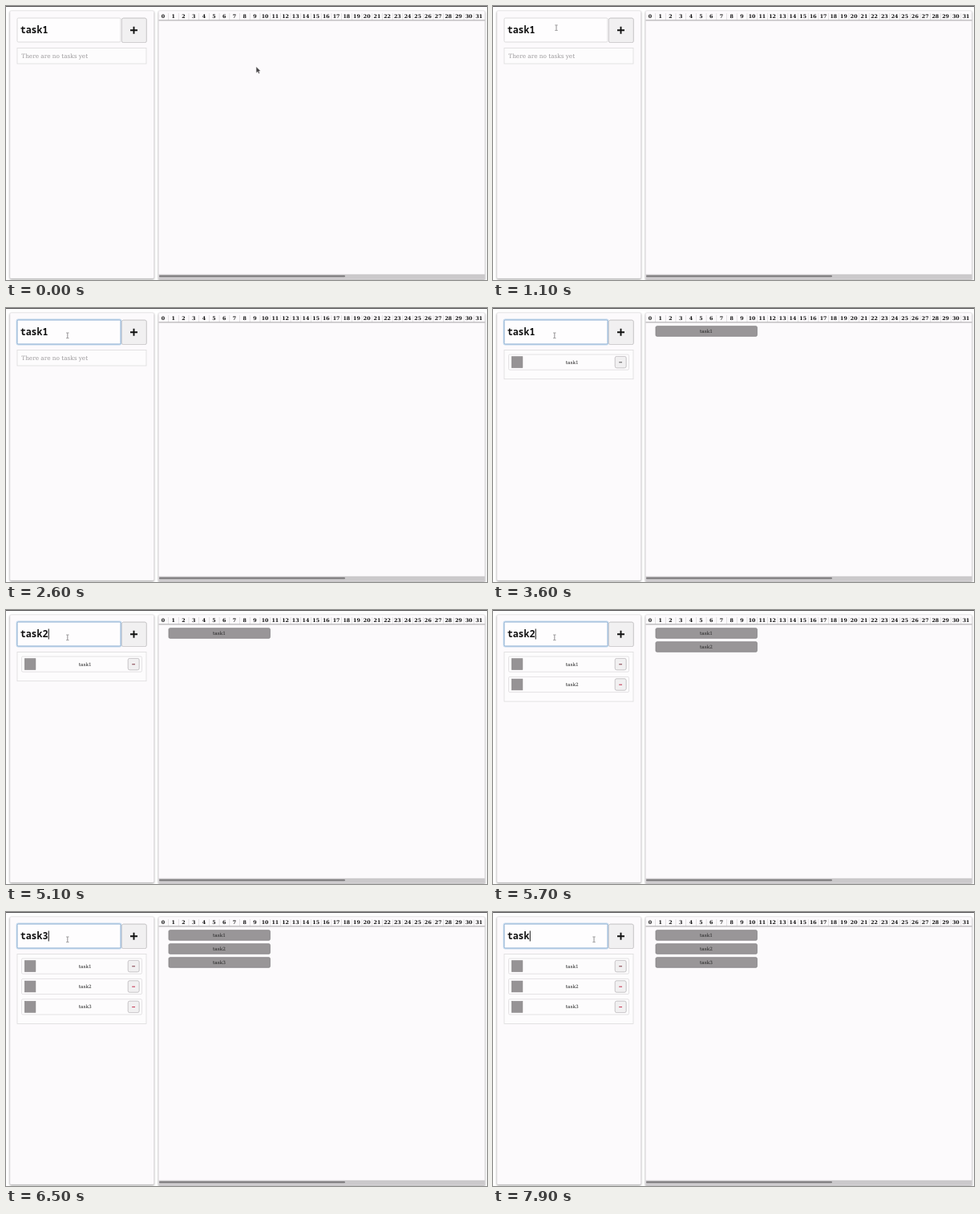
Write an HTML page that moves like this. It is 600 by 342 pixels and loops after 8 s.

```html
<!DOCTYPE html>
<html lang="en">
<head>
<meta charset="utf-8">
<title>Task timeline</title>
<style>
html, body { margin: 0; width: 100%; height: 100%; overflow: hidden; background: #fff; }
svg { display: block; width: 600px; height: 342px; }
text { font-family: "DejaVu Serif", serif; fill: #222; }
.mid { text-anchor: middle; }
.name { font-size: 5.8px; }
.hour { font-size: 6.3px; font-weight: 700; fill: #111; }
.entry { font: 600 11.6px "Noto Sans Mono", "DejaVu Sans Mono", monospace; fill: #111; }
.panel { fill: #fcfafc; stroke: #e2e0e2; stroke-width: .6; filter: drop-shadow(0 1px 1px rgba(0,0,0,.38)); }
.frame { fill: #fdfcfd; stroke: #dddbdd; stroke-width: .8; }
.button { fill: #f1f0f1; stroke: #c9c7c9; stroke-width: .8; filter: drop-shadow(0 .6px .6px rgba(0,0,0,.25)); }
.bar { fill: #999698; stroke: #858284; stroke-width: .8; }
</style>
</head>
<body>
<svg id="stage" viewBox="0 0 600 342"></svg>
<script>
const LOOP = 8000;
const stage = document.getElementById('stage');

function add(tag, attrs, parent = stage, label) {
  const el = document.createElementNS('http://www.w3.org/2000/svg', tag);
  for (const key in attrs) el.setAttribute(key, attrs[key]);
  if (label !== undefined) el.textContent = label;
  parent.appendChild(el);
  return el;
}
const rect = (x, y, width, height, attrs, parent) =>
  add('rect', { x, y, width, height, ...attrs }, parent);
const text = (x, y, label, cls, parent) => add('text', { x, y, class: cls }, parent, label);
const show = (el, on) => el.setAttribute('visibility', on ? 'visible' : 'hidden');

// Window edge and panels
rect(0, 0, 600, 1, { fill: '#4b494b' });
rect(5, 6, 179.5, 334, { class: 'panel', rx: 1.5 });
rect(190.3, 6, 407, 335, { class: 'panel', rx: 1.5 });

// Hour scale
for (let i = 0; i < 32; i++) {
  text(196 + i * 12.71, 15.4, i, 'hour mid');
  if (i) rect(189.5 + i * 12.71, 9, .7, 8.5, { fill: '#d8d6d8' });
}
rect(190.5, 17.4, 407, 1, { fill: '#a5a3a5' });

// Scrollbar
rect(190.5, 334.8, 407, 6, { fill: '#cbc9cb' });
rect(191, 336.3, 232, 2, { rx: 1, fill: '#7b797b' });

// Entry field
const glow = rect(13.2, 14.2, 130.6, 31.6, { rx: 2, fill: 'none', stroke: '#c4d9ee', 'stroke-width': 1.2 });
const field = rect(14, 15, 129, 30, { rx: 1.5, fill: '#fefdfe', 'stroke-width': .9 });
const entry = text(17.7, 33.7, 'task1', 'entry');
const caret = rect(0, 23.5, 1, 13, { fill: '#111' });

rect(144.4, 15.2, 30.8, 30.4, { class: 'button', rx: 2 });
add('path', { d: 'M155 30.2h9M159.5 25.7v9', stroke: '#111', 'stroke-width': 1.9, fill: 'none' });

// Task list
const list = rect(14, 52.4, 161, 19.6, { class: 'frame' });
const empty = text(19.3, 64.6, 'There are no tasks yet', '');
empty.setAttribute('style', 'font-size:7.3px;fill:#9b999b');

const tasks = [3600, 5700, 6500].map((start, i) => {
  const group = add('g', {});
  const y = 58 + i * 25.4;
  rect(19.5, y, 150, 19.2, { class: 'frame', rx: 1.5 }, group);
  rect(23.3, y + 2.7, 13.6, 13.8, { fill: '#969395', stroke: '#858284', 'stroke-width': .6 }, group);
  text(98.7, y + 11.6, 'task' + (i + 1), 'name mid', group);
  rect(152.3, y + 2.5, 13.7, 14.2, { class: 'button', rx: 1.8 }, group);
  const minus = rect(157.2, y + 9.3, 3.8, 1, { fill: i ? '#c2304c' : '#555' }, group);
  const barY = 22.7 + i * 17;
  rect(203, barY, 126.4, 12.6, { class: 'bar', rx: 1.5 }, group);
  text(266, barY + 8.4, 'task' + (i + 1), 'name mid', group);
  return { start, group, minus };
});

// Pointers
const arrow = add('path', { d: 'M0 0V7.3L1.8 5.8L3 8.3L4.1 7.8L3 5.4L5 5Z', fill: '#444244', stroke: '#b5b3b5', 'stroke-width': .4 });
const beam = add('path', { d: 'M-1.6 -3.3H-.5L0 -3L.5 -3.3H1.6M0 -3V3M-1.6 3.3H-.5L0 3L.5 3.3H1.6', fill: 'none', stroke: '#777577', 'stroke-width': .8 });

// Start time, x, y, is text pointer
const pointerSteps = [
  [0, 312.2, 76, 0], [800, 240, 53, 0], [900, 122, 27, 1], [1000, 84, 25, 1],
  [1100, 79, 27.2, 1], [1200, 78, 31, 1], [1300, 76.8, 34.3, 1],
  [7200, 84, 34.3, 1], [7300, 101, 34.3, 1], [7400, 118, 34.3, 1], [7500, 126, 34.3, 1]
];
// Start time, entry text, caret shown
const entrySteps = [
  [0, 'task1', 0], [1500, 'task1', 1], [2600, 'task1', 0], [3800, 'task1', 1],
  [4900, 'task', 1], [5100, 'task2', 1], [6200, 'task', 1], [6300, 'task3', 1],
  [7200, 'task3', 0], [7900, 'task', 1]
];
const at = (steps, t) => steps.filter(s => s[0] <= t).pop();

function draw(t) {
  const [, x, y, isText] = at(pointerSteps, t);
  show(arrow, !isText);
  show(beam, isText);
  (isText ? beam : arrow).setAttribute('transform', `translate(${x} ${y})`);

  const [, value, caretOn] = at(entrySteps, t);
  entry.textContent = value;
  caret.setAttribute('x', 17.7 + value.length * 6.96 + .2);
  show(caret, caretOn);

  const focused = t >= 1500;
  show(glow, focused);
  field.setAttribute('stroke', focused ? '#7fa5cc' : '#d9d7d9');

  const count = tasks.filter(task => task.start <= t).length;
  tasks.forEach(task => show(task.group, task.start <= t));
  tasks[0].minus.setAttribute('fill', t < 4200 ? '#555' : '#7d3844');
  list.setAttribute('height', count ? 10.9 + count * 25.4 : 19.6);
  show(empty, !count);
}

const begin = performance.now();
function tick() {
  draw((performance.now() - begin) % LOOP);
  requestAnimationFrame(tick);
}
tick();
</script>
</body>
</html>
```
